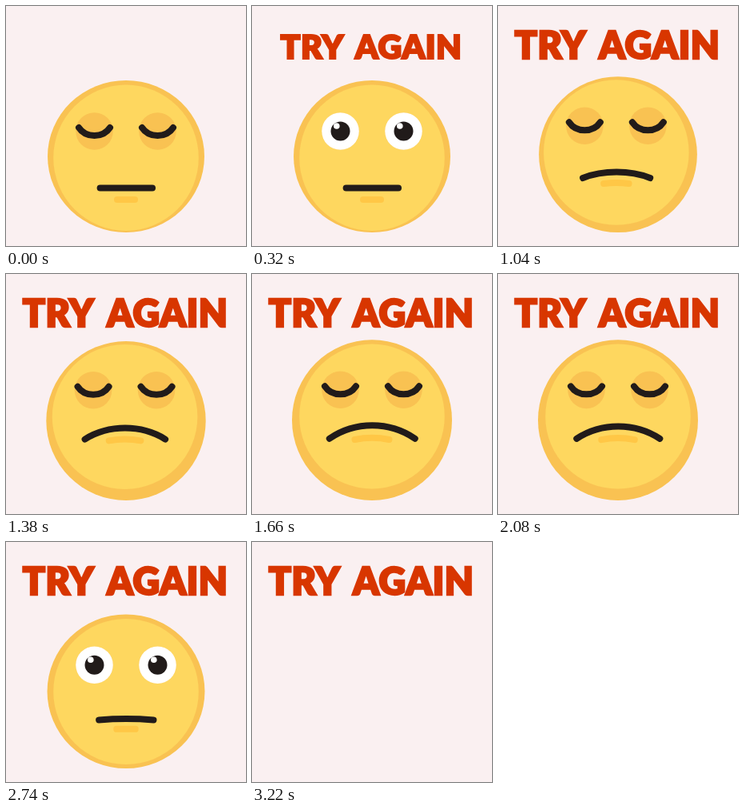
Recreate the animation shown at these times as an HTML page with a canvas. Size 300 by 300 pixels, loop 3.24 s.

```html
<!DOCTYPE html>
<html lang="en">
<head>
<meta charset="utf-8">
<title>Try again</title>
<style>
  html, body { margin: 0; width: 100%; height: 100%; overflow: hidden; background: #faf0f1; }
  canvas { display: block; width: 100vw; height: 100vh; }
</style>
</head>
<body>
<canvas id="stage" width="300" height="300"></canvas>
<script>
const ctx = document.getElementById('stage').getContext('2d');
const LOOP = 3240;
const STEP = 20;
const FACE_END = 3220;
const COLORS = {
  paper: '#faf0f1', rim: '#f9c252', skin: '#fed75f',
  chin: '#ffc746', ink: '#211b1a', white: '#fff', text: '#d83600'
};

const mix = (a, b, k) => a + (b - a) * k;
const ramp = (t, from, to) => Math.min(1, Math.max(0, (t - from) / (to - from)));
const ease = (t, from, to) => {
  const k = ramp(t, from, to);
  return k * k * (3 - 2 * k);
};

function ellipse(x, y, rx, ry, color) {
  ctx.fillStyle = color;
  ctx.beginPath();
  ctx.ellipse(x, y, rx, ry, 0, 0, Math.PI * 2);
  ctx.fill();
}

// Symmetric curve: ends at height y, middle at y + bend.
function arc(x, y, half, bend, roundness, color) {
  const handle = half * roundness;
  const handleY = y + bend / 0.75;
  ctx.strokeStyle = color;
  ctx.lineWidth = 8;
  ctx.lineCap = 'round';
  ctx.beginPath();
  ctx.moveTo(x - half, y);
  ctx.bezierCurveTo(x - handle, handleY, x + handle, handleY, x + half, y);
  ctx.stroke();
}

function drawWord(word, x) {
  ctx.fillText(word, x, 0);
  ctx.strokeText(word, x, 0);
}

function drawText(t) {
  const scale = 1 - Math.pow(1 - ramp(t, 0, 625), 3);
  if (scale <= 0) return;
  ctx.save();
  ctx.translate(149, 66.5);
  ctx.scale(scale, scale);
  ctx.translate(0, -1);
  ctx.font = '900 46.5px Lato, "Open Sans", sans-serif';
  ctx.letterSpacing = '0.5px';
  ctx.textAlign = 'center';
  ctx.fillStyle = ctx.strokeStyle = COLORS.text;
  ctx.lineWidth = 2.4;
  ctx.lineJoin = 'miter';
  ctx.miterLimit = 3;
  drawWord('TRY', -83.5);
  drawWord('AGAIN', 52.7);
  ctx.restore();
}

function drawEye(x, y, open) {
  const r = 23.3;
  ellipse(x, y, r, r, COLORS.rim);
  if (open < 0.03) {
    arc(x, y - 4.5, 19.5, 10, 0.55, COLORS.ink);
    return;
  }
  ctx.save();
  ctx.beginPath();
  ctx.rect(x - 25, y - 25 * open, 50, 50 * open);
  ctx.clip();
  ellipse(x, y, r, r, COLORS.white);
  ellipse(x, y, 12, 12, COLORS.ink);
  ellipse(x - 4.7, y - 6.5, 3.8, 3.8, COLORS.white);
  ctx.restore();
}

function drawFace(t) {
  const back = ease(t, 2040, 3060);
  const swell = ease(t, 480, 1680) - back;
  const lift = ease(t, 480, 1500) - back;
  const frown = ease(t, 480, 1680) - ease(t, 1920, 2900);
  const sway = -2.5 * (ease(t, 780, 1120) - ease(t, 1120, 1700));
  const open = ease(t, 0, 200) - ease(t, 540, 800)
             + ease(t, 2400, 2620) - ease(t, 3000, 3180);

  const top = mix(93, 82.3, swell);
  const innerTop = mix(98.5, 87.5, lift);
  const innerBottom = mix(281, 268.5, lift);
  ellipse(150, (top + 283) / 2, mix(98, 100, swell), (283 - top) / 2, COLORS.rim);
  ellipse(150 + sway, (innerTop + innerBottom) / 2, 90.8, (innerBottom - innerTop) / 2, COLORS.skin);

  const eyeY = mix(156.5, 144.8, lift);
  for (const side of [-39.5, 39.5]) drawEye(150 + side + sway, eyeY, open);

  arc(150 + sway, mix(242, 207, lift), mix(11, 21.5, frown), -2 * frown, 0.4, COLORS.chin);
  arc(150.3 + sway, mix(227.5, 205.7, lift), mix(32.7, 53.5, frown), -16.5 * frown, 0.4, COLORS.ink);
}

function draw(t) {
  ctx.fillStyle = COLORS.paper;
  ctx.fillRect(0, 0, 300, 300);
  drawText(t);
  if (t < FACE_END) drawFace(t);
}

const start = performance.now();
function tick() {
  const t = (performance.now() - start) % LOOP;
  draw(Math.floor(t / STEP) * STEP);
  requestAnimationFrame(tick);
}
tick();
</script>
</body>
</html>
```
